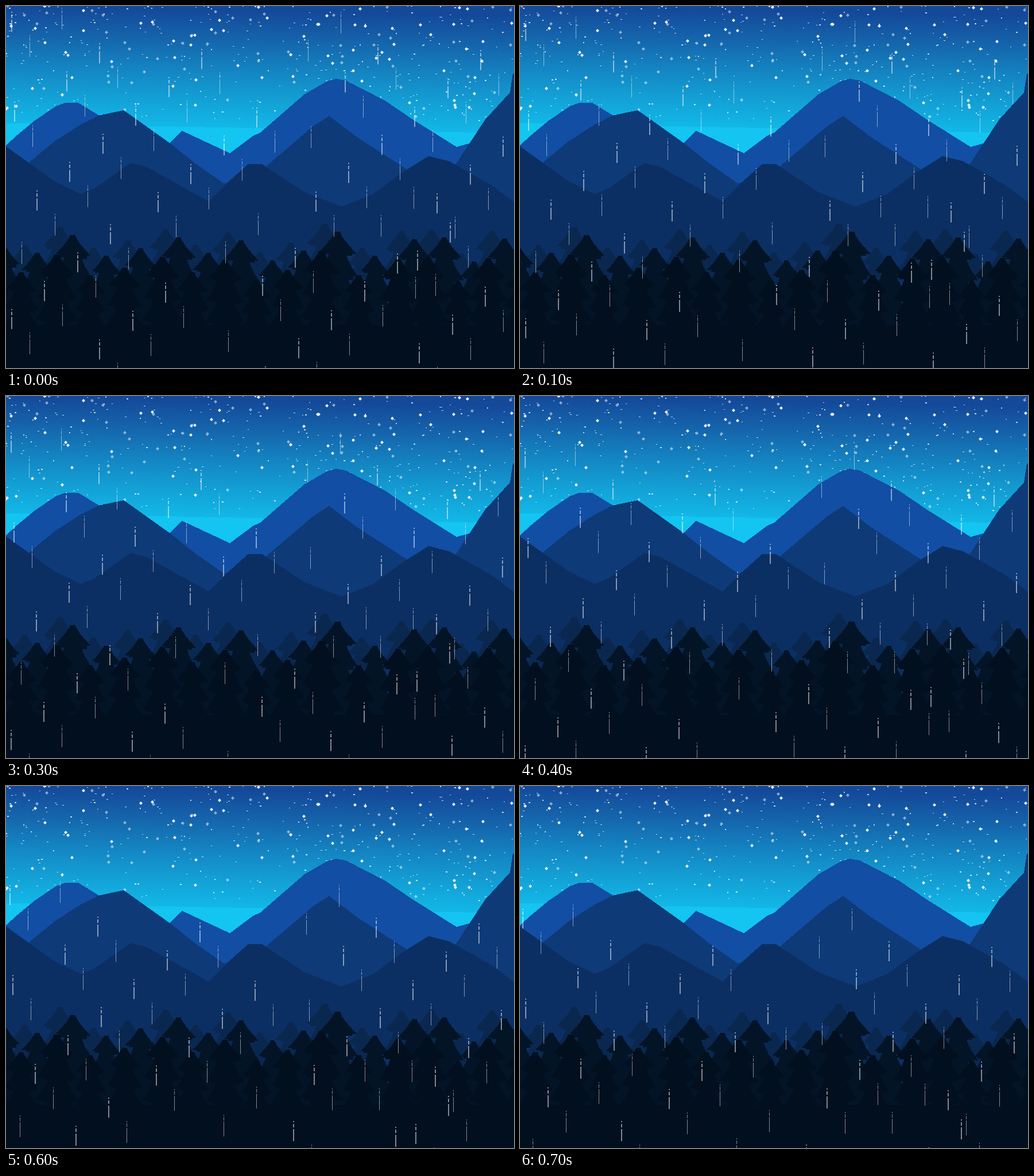
Animation of 885x632 px, one loop 0.8 s. Source, as an HTML page:

```html
<!DOCTYPE html>
<html lang="en">
<head>
<meta charset="utf-8">
<title>Rain over the pines</title>
<style>
  html, body { margin: 0; width: 100%; height: 100%; overflow: hidden; background: #020f1e; }
  svg { display: block; width: 100%; height: 100%; }
</style>
</head>
<body>
<svg viewBox="0 0 885 632" preserveAspectRatio="none" shape-rendering="crispEdges">
  <defs>
    <linearGradient id="sky" gradientUnits="userSpaceOnUse" x1="0" y1="0" x2="-5" y2="250">
      <stop offset="0" stop-color="#14499a"/>
      <stop offset=".2" stop-color="#1564ab"/>
      <stop offset=".4" stop-color="#1482c0"/>
      <stop offset=".6" stop-color="#139dd3"/>
      <stop offset=".818" stop-color="#12b8e7"/>
      <stop offset=".818" stop-color="#13c5f0"/>
    </linearGradient>
  </defs>
  <rect width="885" height="632" fill="url(#sky)"/>
  <g fill="#fff">
    <path id="specks" opacity=".75"/>
    <path id="faint" opacity=".5" shape-rendering="auto"/>
    <path id="bright" opacity=".93" shape-rendering="auto"/>
  </g>
  <path fill="#124ea3" d="M0 243L20 225 50 200 87 175 103 169 126 169 162 191 285 239 307 218 390 257 430 227 443 221 520 154 560 131 575 127 592 130 660 165 710 199 785 246 807 240V400H0z"/>
  <path fill="#0e3a78" d="M40 273L85 236 130 207 162 191 205 182 285 239 330 275 380 310 453 280 535 210 563 192 610 228 698 285 783 277 835 198 878 151 883 118H885V400H40z"/>
  <path fill="#0c2f63" d="M0 245L40 274 85 306 130 328 155 318 190 293 217 274 245 281 353 341 385 309 422 276 446 276 520 325 585 350 640 328 690 291 736 262 772 271 845 312 885 342V632H0z"/>
  <path id="backTrees" fill="#0a284f"/>
  <path id="midTrees" fill="#041427"/>
  <path id="frontTrees" fill="#020f1e"/>
  <g id="rain" fill="#fff" opacity=".5">
    <path id="heavy"/>
    <path id="light"/>
  </g>
</svg>
<script>
const el = id => document.getElementById(id);
const draw = (id, d) => el(id).setAttribute('d', d);
const box = (x, y, w, h) => `M${x} ${y}h${w}v${h}h${-w}z`;

let seed = 7;
const random = () => (seed = seed * 16807 % 2147483647) / 2147483647;

// Stars thin out towards the horizon
function scatter(id, count, shape) {
  let d = '';
  for (let i = 0; i < count; i++) {
    d += shape(Math.floor(random() * 885), Math.floor(random() ** 1.25 * 200));
  }
  draw(id, d);
}
const diamond = (x, y) => `M${x - 3} ${y}l3 -3 3 3 -3 3z`;
scatter('bright', 75, diamond);
scatter('faint', 60, diamond);
scatter('specks', 330, (x, y) => box(x, y, random() < .6 ? 2 : 3, random() < .65 ? 1 : 2));

// Pines: stepped rows, each tier flaring out to a drooping tip
const treeTips = [[-32, 452], [27, 465], [89, 434], [147, 470], [207, 457], [273, 438],
  [325, 465], [382, 443], [437, 478], [491, 461], [550, 428], [615, 470], [684, 441],
  [736, 438], [788, 480], [841, 440], [898, 460]];
const tierHeight = 36;
const tierCount = 5;

function halfWidth(y) {
  const tier = Math.min(tierCount - 1, Math.floor(y / tierHeight));
  const t = y / tierHeight - tier;
  const inner = tier ? 12 + tier * 2 : 4;
  const outer = 29 + tier * 2.5;
  return t < .9 ? inner + (outer - inner) * (t / .9) ** 1.3 : outer * .75;
}

function tree([x, y]) {
  const size = 1.1 - (y - 434) / 190;
  let d = '';
  for (let row = 0; row < tierCount * tierHeight * size; row += 3) {
    const left = Math.round(halfWidth((row + 3) / size) * size);
    const right = Math.round(halfWidth(row / size) * size);
    d += box(x - left, y + row, left + right, 3);
  }
  return d;
}

// The same row of pines stands three times, shifted
function forest(id, dx, dy, ground) {
  draw(id, treeTips.map(tree).join('') + box(-40, ground - dy, 965, 200));
  el(id).setAttribute('transform', `translate(${dx} ${dy})`);
}
forest('backTrees', 6, -48, 530);
forest('midTrees', 28, -34, 551);
forest('frontTrees', 0, 0, 557);

// Rain falls in slanting lanes, each given by its first drop and its length
const heavyLanes = [[10, 10, 1], [163, 65, 2], [341, 75, 7], [648, 67, 2], [827, 77, 6],
  [15, 167, 1], [437, 177, 4], [866, 228, 3], [182, 381, 4], [774, 378, 2], [504, 422, 2],
  [682, 432, 5], [278, 483, 3], [835, 490, 3]];
const lightLanes = [[97, 3, 1], [583, 10, 2], [531, 210, 1], [710, 316, 2], [439, 362, 2],
  [387, 566, 1]];
const drops = ([x, y, count]) =>
  Array.from({ length: count }, (_, i) => [Math.round(x - 57.5 * i), Math.round(y + 49.3 * i)]);
const heavyDrop = ([x, y]) => box(x - 1, y, 2, 2) + box(x - 1, y + 5, 2, 6) + box(x - 1, y + 14, 2, 21);
const lightDrop = ([x, y]) => box(x, y, 1, 2) + box(x, y + 4, 1, 6) + box(x, y + 12, 1, 26);

// Every heavy drop has a light one beside it
const heavy = heavyLanes.flatMap(drops);
const light = heavy.map(([x, y]) => [x + 31, y + 41]).concat(lightLanes.flatMap(drops));
draw('heavy', heavy.map(heavyDrop).join(''));
draw('light', light.map(lightDrop).join(''));

// The fall gathers speed in three stages, shown in eight steps
function render(ms) {
  const n = Math.floor(ms % 800 / 100);
  const y = Math.round(Math.max(16 * n, 23.5 * n - 17, 40.8 * n - 82));
  const x = -Math.round(5 * (n / 7) ** 2.5);
  el('rain').setAttribute('transform', `translate(${x} ${y})`);
}

let start;
function tick(now) {
  if (start === undefined) start = now;
  render(Math.max(0, now - start));
  requestAnimationFrame(tick);
}
render(0);
requestAnimationFrame(tick);
</script>
</body>
</html>
```
